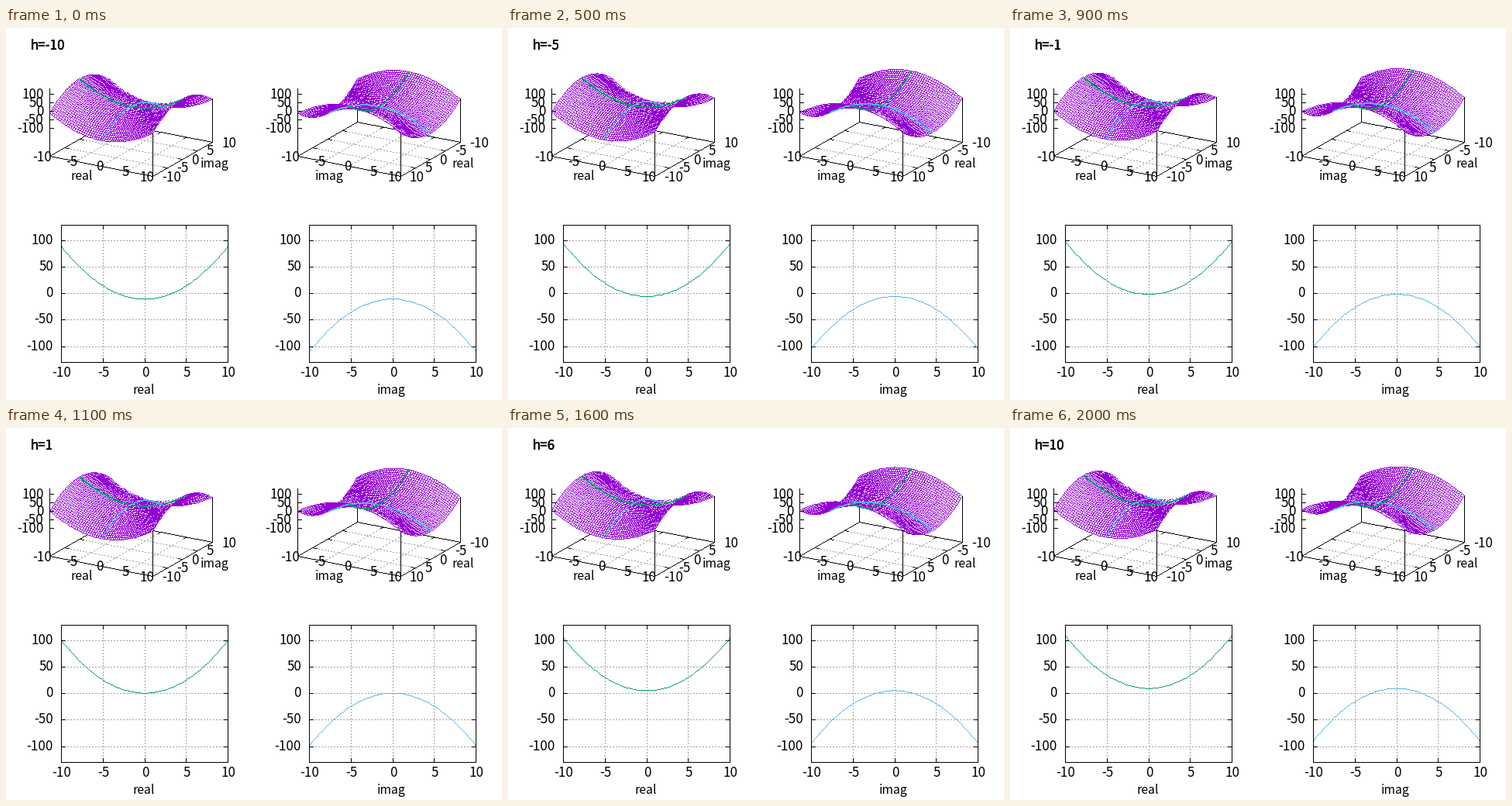
Animation of 640x480 px, one loop 2100 ms. Source, as a matplotlib script:

```python
import numpy as np
import matplotlib.pyplot as plt
from matplotlib.animation import FuncAnimation
from matplotlib.colors import to_rgb

W, H, DPI = 640, 480, 100
SHIFT = 320
FLOOR = -260
TICKS = (-10, -5, 0, 5, 10)
Z_TICKS = (-100, -50, 0, 50, 100)


def rgb(color):
    return np.round(np.array(to_rgb(color)) * 255).astype(np.uint8)


PURPLE, GREEN, BLUE, GRAY, BLACK, WHITE = map(
    rgb, ("#9400d3", "#009e73", "#56b4e9", "#a0a0a0", "black", "white"))

plt.rcParams["font.family"] = ["Noto Sans CJK JP", "DejaVu Sans"]
fig = plt.figure(figsize=(W / DPI, H / DPI), dpi=DPI, facecolor="white")
ax = fig.add_axes([0, 0, 1, 1])
ax.axis("off")

base = np.full((H, W, 3), 255, np.uint8)
picture = ax.imshow(base, interpolation="nearest", aspect="auto")
t = np.linspace(-10, 10, 50)
zero = np.zeros_like(t)


def label(x, y, s, ha="center", size=17):
    return ax.text(x - 1, y, s, ha=ha, va="baseline", fontsize=size * 72 / DPI)


def word(x, y, s):
    label(x, y, s, size=15.8)


def to_pixel(p):
    return np.floor(np.asarray(p, float) + 0.5)


def trace(p, q):
    """Pixels of the one pixel wide lines from p to q, without smoothing."""
    p, q = to_pixel(p), to_pixel(q)
    d = (q - p)[..., None, :]
    size = np.abs(d).max(-1, keepdims=True)
    k = np.arange(size.max() + 1)[:, None]
    s = np.minimum(k, size) / np.maximum(size, 1)
    return to_pixel(p[..., None, :] + d * s).astype(int)


def paint(img, pix, color):
    """Later pixels cover earlier ones."""
    img[pix[..., 1], pix[..., 0]] = color


def path(img, points, color=BLACK, thick=False):
    points = np.asarray(points, float)
    pix = trace(points[:-1], points[1:])
    paint(img, pix, color)
    if thick:
        paint(img, pix + (1, 0), color)
        paint(img, pix + (0, 1), color)


def dashes(img, p, q):
    pix = trace(p, q)
    paint(img, pix[np.arange(len(pix)) % 4 < 2], GRAY)


class Surface:
    """Saddle seen from above; sign is +1 if the real axis runs along a."""

    def __init__(self, dx, sign, names, b_labels):
        self.dx, self.sign = dx, sign
        self.colors = (GREEN, BLUE) if sign > 0 else (BLUE, GREEN)
        self.a, self.b = np.meshgrid(t, t)
        mid = (t[:-1] + t[1:]) / 2
        ma, mb = np.meshgrid(mid, mid)
        # far cells first, so that near ones cover them
        self.order = np.argsort((0.5 * ma - 0.866 * mb).ravel(), kind="stable")
        self.draw_box(names, b_labels)

    def project(self, a, b, z=FLOOR):
        u = self.dx + 160.75 + 6.625 * a + 3.85 * b
        v = 156 + 1.3 * a - 2.2 * b - 0.223 * (z - FLOOR)
        return np.stack(np.broadcast_arrays(u, v), axis=-1)

    def height(self, a, b, h):
        return self.sign * (a * a - b * b) + h

    def draw_box(self, names, b_labels):
        p = self.project
        for k in TICKS[1:-1]:
            dashes(base, p(k, -10), p(k, 10))
            dashes(base, p(-10, k), p(10, k))
        for k in TICKS[1:-1]:
            for e in (-10, 10):
                inner = e * 0.92
                path(base, [p(k, e), p(k, inner)])
                path(base, [p(e, k), p(inner, k)])
        path(base, [p(-10, -10), p(10, -10), p(10, 10), p(-10, 10),
                    p(-10, -10)])

        for z in Z_TICKS:
            x, y = p(-10, -10, z)
            label(x - 7, y + 5.5, str(z), "right")
        for k, name in zip(TICKS, b_labels):
            u, v = p(k, -10)
            label(u + 4, v + 6, str(k), "right")
            u, v = p(10, k)
            label(u + 13, v + 6, str(name), "left")
        word(self.dx + 98, 195, names[0])
        word(self.dx + 270, 180, names[1])

    def draw_mesh(self, img, h):
        pts = self.project(self.a, self.b, self.height(self.a, self.b, h))
        pts = to_pixel(pts)
        c00, c10, c01, c11 = (
            c.reshape(-1, 1, 2)[self.order]
            for c in (pts[:-1, :-1], pts[:-1, 1:], pts[1:, :-1], pts[1:, 1:]))
        edges = trace(np.concatenate([c00, c01, c00, c10], axis=1),
                      np.concatenate([c10, c11, c01, c11], axis=1))
        edges = edges.reshape(len(c00), -1, 2)

        r, s = (g.reshape(1, -1, 1)
                for g in np.meshgrid(*[np.linspace(0.12, 0.88, 6)] * 2))
        fill = ((1 - r) * (1 - s) * c00 + r * (1 - s) * c10
                + (1 - r) * s * c01 + r * s * c11)
        fill = to_pixel(fill).astype(int)
        color = np.concatenate([np.tile(WHITE, (fill.shape[1], 1)),
                                np.tile(PURPLE, (edges.shape[1], 1))])
        paint(img, np.concatenate([fill, edges], axis=1), color)

    def draw(self, img, h):
        p = self.project

        def post(a, b):
            path(img, [p(a, b), p(a, b, h)])

        post(-10, 10)
        self.draw_mesh(img, h)
        post(10, -10)
        post(10, 10)
        path(img, [p(-10, -10), p(-10, -10, 130)])
        for z in Z_TICKS:
            x, y = p(-10, -10, z)
            path(img, [(x, y), (x + 5, y)])
        for (a, b), color in zip(((t, zero), (zero, t)), self.colors):
            path(img, p(a, b, self.height(a, b, h)), color, thick=True)


class Chart:
    def __init__(self, dx, sign, name, color):
        self.dx, self.sign, self.color = dx, sign, color
        x0, x1, y0, y1 = dx + 71, dx + 286, 254, 431
        self.frame = [(x0, y0), (x1, y0), (x1, y1), (x0, y1), (x0, y0)]
        for k in TICKS:
            x = self.x(k)
            dashes(base, (x, y1), (x, y0))
            label(x + 1.5, 450, str(k))
        for k in Z_TICKS:
            y = self.y(k)
            dashes(base, (x0, y), (x1, y))
            label(x0 - 9.5, y + 4.5, str(k), "right")
        for x in map(self.x, TICKS):
            path(base, [(x, y0), (x, y0 + 5)])
            path(base, [(x, y1), (x, y1 - 5)])
        for y in map(self.y, Z_TICKS):
            path(base, [(x0, y), (x0 + 5, y)])
            path(base, [(x1, y), (x1 - 5, y)])
        word(dx + 178, 472, name)

    def x(self, v):
        return self.dx + 178.5 + 10.75 * v

    def y(self, v):
        return 342.4 - 0.681 * v

    def draw(self, img, h):
        curve = np.stack([self.x(t), self.y(self.sign * t * t + h)], axis=-1)
        path(img, curve, self.color)
        path(img, self.frame)


parts = [
    Surface(0, 1, ("real", "imag"), TICKS),
    Surface(SHIFT, -1, ("imag", "real"), TICKS[::-1]),
    Chart(0, 1, "real", GREEN),
    Chart(SHIFT, -1, "imag", BLUE),
]
# the heading is overprinted, which makes it look heavier
titles = [label(32, 28, "", "left") for _ in range(4)]


def update(i):
    h = i - 10
    img = base.copy()
    for part in parts:
        part.draw(img, h)
    picture.set_data(img)
    for title in titles:
        title.set_text(f"h={h}")
    return []


anim = FuncAnimation(fig, update, frames=21, interval=100, repeat=True,
                     repeat_delay=0, blit=False)
plt.show()
```
